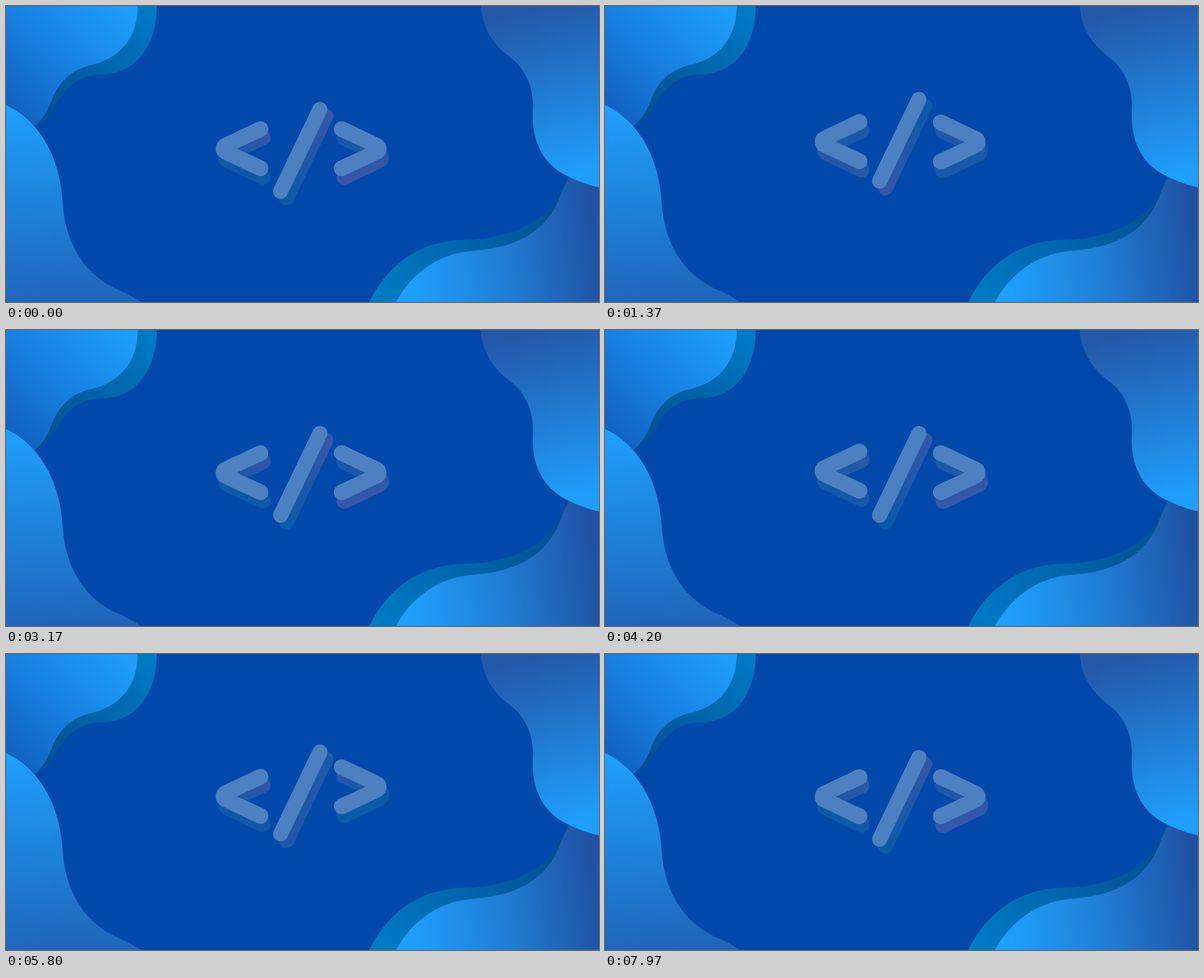
Write an HTML page that moves like this. It is 1058 px wide and 529 px high and loops after 8.01 s.

```html
<!DOCTYPE html>
<html lang="en">
<head>
<meta charset="utf-8">
<title>Code icon wave</title>
<style>
  html, body { margin: 0; width: 100%; height: 100%; overflow: hidden; background: #0049aa; }
  svg { display: block; width: 100vw; height: 100vh; }
  .face { fill: #4d80c0; }
</style>
</head>
<body>
<svg viewBox="0 0 1058 529" preserveAspectRatio="none">
  <defs>
    <g id="angle">
      <path d="M448 207.3A14 14 0 0 1 460 232.7L411.5 255L460 277.3A14 14 0 0 1 448 302.7L385.5 273.1A20 20 0 0 1 385.5 236.9Z"/>
    </g>
    <g id="angleR"><use href="#angle" transform="matrix(-1 0 0 1 1053 0)"/></g>
    <path id="bar" d="M547.8 179.2A13.5 13.5 0 0 1 572.2 190.8L502.2 336.8A13.5 13.5 0 0 1 477.8 325.2Z"/>

    <linearGradient id="tl" gradientUnits="userSpaceOnUse" x1="225" y1="10" x2="40" y2="200">
      <stop stop-color="#1e9efb"/><stop offset=".5" stop-color="#1884e4"/><stop offset="1" stop-color="#1264c4"/>
    </linearGradient>
    <linearGradient id="tlShade" gradientUnits="userSpaceOnUse" x1="265" y1="20" x2="70" y2="190">
      <stop stop-color="#0079c5"/><stop offset="1" stop-color="#00508f"/>
    </linearGradient>
    <linearGradient id="left" gradientUnits="userSpaceOnUse" x1="40" y1="180" x2="60" y2="529">
      <stop stop-color="#1f9ffc"/><stop offset=".5" stop-color="#1d82da"/><stop offset="1" stop-color="#1f66bb"/>
    </linearGradient>
    <linearGradient id="tr" gradientUnits="userSpaceOnUse" x1="935" y1="10" x2="1010" y2="300">
      <stop stop-color="#2459aa"/><stop offset=".5" stop-color="#207bd2"/><stop offset="1" stop-color="#1f9efb"/>
    </linearGradient>
    <linearGradient id="br" gradientUnits="userSpaceOnUse" x1="725" y1="500" x2="1058" y2="450">
      <stop stop-color="#1f9efb"/><stop offset=".5" stop-color="#207dd4"/><stop offset="1" stop-color="#2052a3"/>
    </linearGradient>
    <linearGradient id="brShade" gradientUnits="userSpaceOnUse" x1="670" y1="510" x2="985" y2="350">
      <stop stop-color="#0079c5"/><stop offset="1" stop-color="#00508f"/>
    </linearGradient>

    <linearGradient id="openShade" gradientUnits="userSpaceOnUse" x1="455" y1="215" x2="425" y2="290">
      <stop/><stop offset="1"/>
    </linearGradient>
    <linearGradient id="slashShade" gradientUnits="userSpaceOnUse" x1="565" y1="185" x2="490" y2="335">
      <stop/><stop offset="1"/>
    </linearGradient>
    <linearGradient id="closeShade" gradientUnits="userSpaceOnUse" x1="615" y1="222" x2="605" y2="298">
      <stop/><stop offset="1"/>
    </linearGradient>
  </defs>

  <rect width="1058" height="529" fill="#0049aa"/>

  <path fill="url(#tlShade)" d="M0 0H269C269 62 238 121 172 122C130 122 106 147 92 172C80 195 66 209 49 216H0Z"/>
  <path fill="url(#tl)" d="M0 0H235C235 60 200 95 150 106C112 115 92 140 81 170C73 192 62 206 49 216H0Z"/>
  <path fill="url(#left)" d="M0 177C60 205 96 270 101 350C106 430 145 485 205 509Q224 518 241 529H0Z"/>

  <path fill="url(#brShade)" d="M648 529C680 465 735 420 815 418C890 418 955 390 982 346Q988 334 1004 305H1058V529Z"/>
  <path fill="url(#br)" d="M696 529C722 480 770 441 838 437C915 431 962 400 985 350Q993 328 1004 305H1058V529Z"/>
  <path fill="url(#tr)" d="M847 0C850 40 870 70 900 92C930 115 942 150 940 185C937 245 960 285 1004 305Q1035 320 1058 324V0Z"/>

  <g id="open">
    <use href="#angle" x="4" y="15" fill="url(#openShade)"/>
    <use href="#angle" class="face"/>
  </g>
  <g id="slash">
    <use href="#bar" x="10.5" y="12" fill="url(#slashShade)"/>
    <use href="#bar" class="face"/>
  </g>
  <g id="close">
    <use href="#angleR" x="4.5" y="15.5" fill="url(#closeShade)"/>
    <use href="#angleR" class="face"/>
  </g>
</svg>
<script>
  const LOOP = 8010, HALF = 1000, LIFT = 18.1;
  const WAVES = [0, 3937];
  const PURPLE = '#3556a9', TEAL = '#0a5aa7';

  // id, delay within each wave, shade colours at rest
  const PARTS = [
    ['open', 0, PURPLE, TEAL],
    ['slash', 385, PURPLE, TEAL],
    ['close', 770, TEAL, PURPLE]
  ];

  // Goes from rest to peak and back once per wave.
  function wave(el, delay, prop, rest, peak) {
    const steps = [[0, rest]];
    for (const start of WAVES) {
      const t = start + delay;
      steps.push([t, rest], [t + HALF, peak], [t + 2 * HALF, rest]);
    }
    steps.push([LOOP, rest]);
    const frames = steps.map(([t, value]) => ({
      offset: t / LOOP, [prop]: value, easing: 'cubic-bezier(.37,0,.63,1)'
    }));
    el.animate(frames, { duration: LOOP, iterations: Infinity });
  }

  for (const [id, delay, top, bottom] of PARTS) {
    wave(document.getElementById(id), delay, 'transform', 'translateY(0px)', `translateY(${-LIFT}px)`);
    const [a, b] = document.querySelectorAll(`#${id}Shade stop`);
    wave(a, delay, 'stopColor', top, bottom);
    wave(b, delay, 'stopColor', bottom, top);
  }
</script>
</body>
</html>
```
